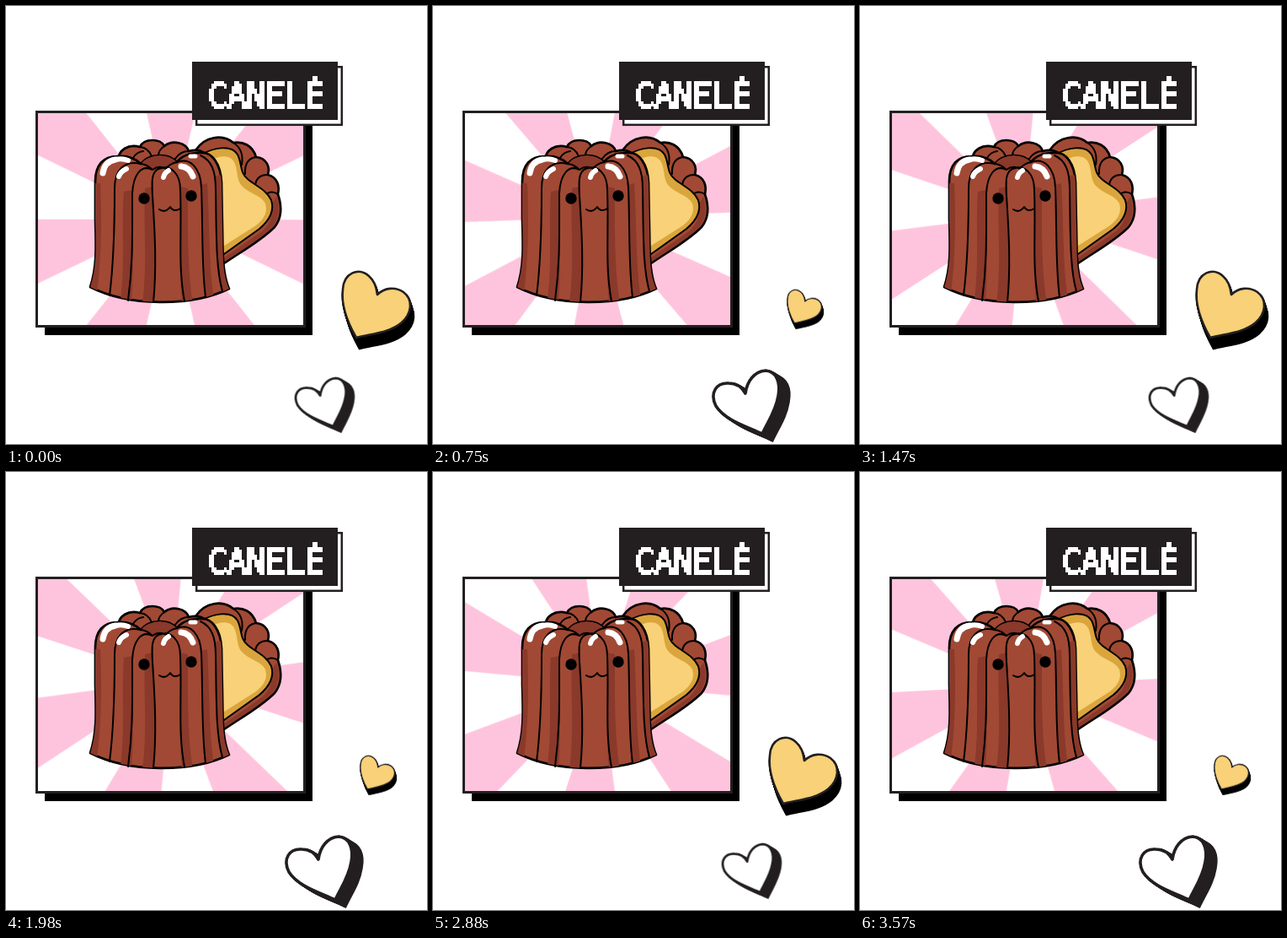
These frames come from a looping animation (500 by 519 pixels, 3600 ms). An HTML page:

```html
<!DOCTYPE html>
<html lang="en">
<head>
<meta charset="utf-8">
<title>Canelé</title>
<style>
  html, body { margin: 0; width: 100%; height: 100%; overflow: hidden; background: #fff; }
  svg { display: block; width: 500px; height: 519px; }
  .line { fill: none; stroke: #000; stroke-width: 2; stroke-linecap: round; stroke-linejoin: round; }
  .brown { fill: #a14934; stroke: #000; stroke-width: 2.7; stroke-linejoin: round; }
  .dark { fill: #8a392a; }
  .shine { fill: none; stroke: #fff; stroke-linecap: round; stroke-linejoin: round; }
  #title { font: 39px "DejaVu Sans Mono", monospace; letter-spacing: -.6px; fill: #fff; stroke: #fff; stroke-width: 2.4; }
  #rays { transform-origin: 195.6px 249.6px; }
  #gold { transform-origin: 442.5px 358px; }
  #white { transform-origin: 380px 470px; }
</style>
</head>
<body>
<svg viewBox="0 0 500 519">
  <defs>
    <clipPath id="window"><rect x="37" y="126" width="317" height="253"/></clipPath>
    <clipPath id="cake"><use href="#body"/></clipPath>
    <filter id="pixels" filterUnits="userSpaceOnUse" x="232" y="68" width="150" height="60" color-interpolation-filters="sRGB">
      <feFlood x="233" y="69" width="1" height="1" flood-color="#fff"/>
      <feComposite x="232" y="68" width="3" height="3"/>
      <feTile result="dots"/>
      <feComposite in="SourceGraphic" in2="dots" operator="in"/>
      <feComponentTransfer><feFuncA type="discrete" tableValues="0 1"/></feComponentTransfer>
      <feMorphology operator="dilate" radius="1"/>
    </filter>
  </defs>

  <!-- picture frame -->
  <rect x="46" y="135" width="318" height="255"/>
  <rect x="36.5" y="125.5" width="318" height="254" fill="#fff"/>
  <g clip-path="url(#window)"><path id="rays" fill="#ffc4dd"/></g>
  <rect x="36.5" y="125.5" width="318" height="254" fill="none" stroke="#231f20" stroke-width="3"/>

  <!-- cut half -->
  <path class="brown" d="M226 170C236 155 257 151 270 162C281 160 293 165 297 179C309 180 314 190 311 200C323 203 325 214 323 223C328 238 327 252 319 262C302 279 279 291 256 307Z"/>
  <path class="dark" d="M315 236C318 248 313 259 304 267L258 299V304C281 289 303 275 317 261C325 251 325 236 321 226Z"/>
  <path class="line" d="M270 162Q283 170 280 188M297 179Q283 181 284 199M311 200Q297 200 296 213M323 223Q314 217 307 225"/>
  <path fill="#daa53c" stroke="#000" stroke-width="2" d="M234 175C245 169 267 163 275 176C281 188 277 197 287 205C296 213 310 218 315 230C319 243 313 254 301 264L256 296Z"/>
  <path fill="#f8d178" d="M243 183C254 177 266 176 271 185C276 195 273 205 280 213C288 222 303 224 308 234C311 244 307 252 297 260L256 286Z"/>

  <!-- whole cake -->
  <path class="brown" d="M133 184C133 170 146 163 159 167C164 156 184 157 188 166C198 158 214 162 217 172C232 168 241 175 243 188L190 204Z"/>
  <path class="line" d="M159 167Q169 168 173 178M188 166Q181 171 181 177M217 172Q207 172 201 181M151 180Q155 173 163 172"/>
  <path id="body" class="brown" d="M100 333C108 309 107 286 106 252V208C106 188 116 178 132 178C144 177 154 181 160 187C171 174 193 174 203 185C209 177 219 174 231 174C245 172 255 188 256 209L257.5 290C258 311 260 324 265 335C220 357 145 356 100 333Z"/>
  <g class="dark" clip-path="url(#cake)">
    <path d="M106 210H112C114 260 113 300 108 340H98Z"/>
    <path d="M150 218C149 270 153 300 149 350L136 348C142 300 137 260 140 220Z"/>
    <path d="M174 214C175 270 180 310 175 353L162 352C168 310 163 260 165 216Z"/>
    <path d="M207 214C207 270 205 310 209 353H222C215 310 216 260 216 216Z"/>
    <path d="M232 212C235 270 232 310 237 350L247 347C241 310 242 260 239 210Z"/>
    <path d="M249 201C252 270 249 310 257 344L268 340L258 200Z"/>
    <path d="M160 187C171 174 193 174 203 185Q194 187 190 193Q182 188 174 194Q168 188 160 187Z"/>
  </g>
  <path class="line" d="M160 187C140 182 129 195 129 216C129 265 128 304 123 343M174 194C160 187 151 201 150 222C150 270 151 304 145 349M174 225C173 206 173 197 181 193C196 187 207 199 207 218C209 270 204 307 212 350M174 225C177 270 179 312 175 351M203 185C219 179 231 192 232 215C234 265 232 307 237 345M231 177C244 183 249 195 249 217C250 270 249 310 257 338M160 187Q168 188 174 194Q182 188 190 193Q194 187 203 185"/>
  <g class="shine">
    <path stroke-width="7" d="M115 198Q117 184 130 182"/>
    <path stroke-width="6" d="M130 182Q138 180 145 183M134 202Q136 196 143 193M187 203Q188 198 193 195"/>
    <path stroke-width="7" d="M208 190Q218 191 222 202"/>
    <path stroke-width="5" d="M219 178H225"/>
  </g>
  <circle cx="164" cy="228" r="6.7"/>
  <circle cx="220" cy="225" r="6.7"/>
  <path class="line" d="M182 241Q189 246 195 238Q199 245 207 240"/>

  <!-- label -->
  <rect x="226.2" y="72.2" width="172.6" height="68.6" fill="#fff" stroke="#231f20" stroke-width="2.5"/>
  <rect x="221" y="66" width="173" height="69" fill="#231f20"/>
  <g filter="url(#pixels)"><text id="title" x="239.5" y="120">CANELÉ</text></g>

  <g id="gold"></g>
  <g id="white"></g>
</svg>
<script>
const $ = id => document.getElementById(id);
const LOOP = 3600, RAYS = 7;

// one wedge and one equal gap per ray; the hub sits just below the pivot
const hub = { x: 195.6, y: 253.1 };
const at = (deg, r = 260) => {
  const a = deg * Math.PI / 180;
  return `${hub.x + r * Math.cos(a)} ${hub.y + r * Math.sin(a)}`;
};
const step = 360 / RAYS;
$('rays').setAttribute('d', Array.from({ length: RAYS }, (_, i) =>
  `M${hub.x} ${hub.y}L${at(180 + i * step)}L${at(180 + (i - .5) * step)}Z`).join(''));

// a heart face over its stacked shadow
function heart(id, d, fill, shade, line, dx, dy) {
  let out = '';
  for (let i = 12; i > 0; i--) {
    out += `<path d="${d}" transform="translate(${dx * i / 12} ${dy * i / 12})" fill="${shade}" stroke="${shade}" stroke-width="${line}"/>`;
  }
  $(id).innerHTML = out + `<path d="${d}" fill="${fill}" stroke="#231f20" stroke-width="${line}" stroke-linejoin="round"/>`;
}
heart('gold', 'M416 393C404 372 398 352 400 336C401 316 419 309 431 320C438 326 440 333 441 342C449 334 462 332 472 339C484 348 482 364 470 375C456 387 436 388 416 393Z',
  '#f8d178', '#000', 2.6, 4, 13);
heart('white', 'M391 507C372 498 347 491 336 474C328 458 337 446 351 447C361 447 367 452 371 459C373 444 382 433 395 432C408 433 413 446 410 462C407 480 398 492 391 507Z',
  '#fff', '#231f20', 3.6, 12, 7.5);

const play = (id, frames, duration) => $(id).animate(frames, { duration, iterations: Infinity });
const toggle = (id, a, b) => play(id, [
  { transform: a, easing: 'step-end' },
  { transform: b, offset: .5, easing: 'step-end' },
  { transform: b }
], LOOP / 3);

play('rays', [{ transform: 'rotate(0deg)' }, { transform: 'rotate(360deg)' }], LOOP);
toggle('gold', 'scale(1)', 'scale(.505)');
toggle('white', 'scale(.766)', 'scale(1)');
</script>
</body>
</html>
```
